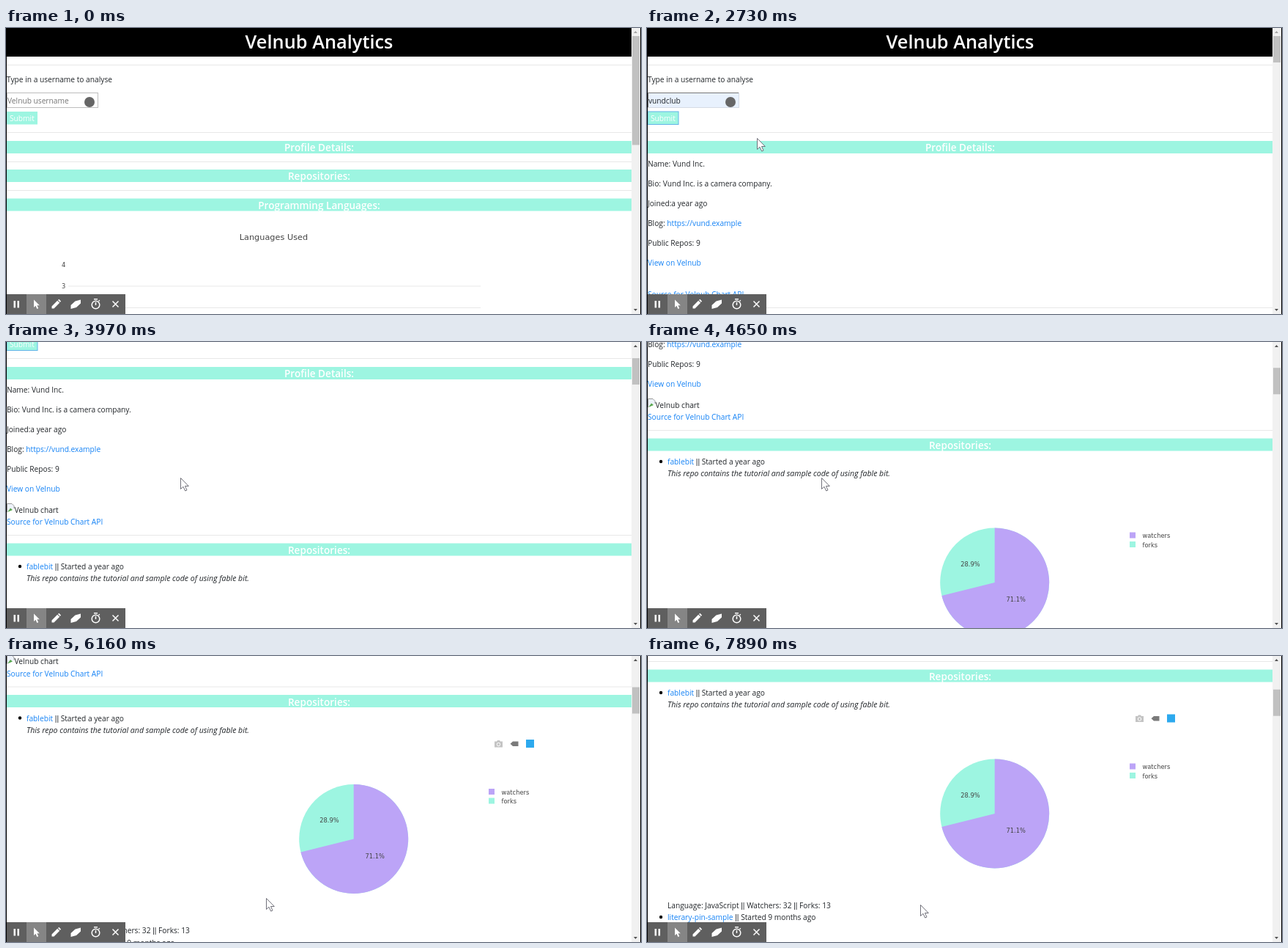
Recreate the animation shown at these times as an HTML page. Size 867 by 390 pixels, loop 8000 ms.

```html
<!DOCTYPE html>
<html lang="en">
<head>
<meta charset="utf-8">
<title>Analytics page</title>
<style>
html, body { margin: 0; width: 100%; height: 100%; overflow: hidden; background: #fff }
svg { display: block; width: 100%; height: 100% }
text { font: 10.2px "Open Sans", sans-serif; fill: #212529; white-space: pre }
.title { font-size: 25.4px; font-weight: 600; fill: #fff; text-anchor: middle }
.head { font-size: 13.6px; font-weight: 600; fill: #fff; text-anchor: middle }
.link { fill: #1482f5 }
.bar { font-family: "Liberation Sans", sans-serif }
.note { font-size: 10.55px; font-style: italic }
.plot text { font: 8.3px "DejaVu Sans", sans-serif; fill: #444 }
.plot .name { font-size: 11.3px }
.teal { fill: #9df5e1 }
.violet { fill: #bca4f7 }
.rule { stroke: #e8e8e8; fill: none }
.mid { text-anchor: middle }
</style>
</head>
<body>
<svg viewBox="0 0 867 390">
  <g id="page">
    <rect width="854" height="39"/>
    <text class="title" x="427.5" y="28">Velnub Analytics</text>
    <path class="rule" d="M1 50.5H854M1 142.5H854"/>
    <text x="1" y="74">Type in a username to analyse</text>

    <rect id="field" x="1.5" y="88.5" width="124" height="20"/>
    <path id="inset" d="M1.5 108V88.5H125" fill="none" stroke="#777"/>
    <text id="hint" x="2" y="103" style="fill:#757575">Velnub username</text>
    <text id="typed" x="2" y="103"></text>
    <path id="squiggle" stroke="#e03c3c" fill="none"/>
    <path id="caret" stroke="#111" fill="none"/>
    <circle cx="114" cy="101" r="7" fill="#666"/>

    <rect id="button" class="teal" x="1" y="114" width="42" height="17.5"/>
    <text x="5" y="127" style="fill:#fff">Submit</text>

    <rect class="teal" x="1" y="154" width="853" height="17"/>
    <text class="head" x="427.5" y="168">Profile Details:</text>

    <g id="empty">
      <path class="rule" d="M1 182.5H854M1 221.5H854"/>
      <rect class="teal" x="1" y="193" width="853" height="17"/>
      <text class="head" x="427.5" y="207">Repositories:</text>
      <rect class="teal" x="1" y="232.5" width="853" height="17"/>
      <text class="head" x="427.5" y="247">Programming Languages:</text>
      <g class="plot">
        <path class="rule" d="M85 352H648M85 381.5H648"/>
        <text class="name mid" x="365.5" y="289">Languages Used</text>
        <text x="76" y="325.5">4</text>
        <text x="76" y="355">3</text>
      </g>
    </g>

    <g id="loaded">
      <text x="1" y="189">Name: Vund Inc.</text>
      <text x="1" y="216">Bio: Vund Inc. is a camera company.</text>
      <text x="1" y="243">Joined:a year ago</text>
      <text x="1" y="270">Blog: <tspan class="link">https://vund.example</tspan></text>
      <text x="1" y="297">Public Repos: 9</text>
      <text x="1" y="324" class="link">View on Velnub</text>
      <g id="alt">
        <path d="M1.5 352V340.5H8L11 343.5V347" fill="#eef3fb" stroke="#999"/>
        <path d="M2 352L6 346.5L9 349Z" fill="#5aa850"/>
        <text x="11.5" y="352.5">Velnub chart</text>
      </g>
      <g id="rest">
        <text x="1" y="369" class="link">Source for Velnub Chart API</text>
        <path class="rule" d="M1 383.5H854"/>
        <rect class="teal" x="1" y="394.5" width="853" height="17"/>
        <text class="head" x="427.5" y="409">Repositories:</text>
        <circle cx="19" cy="426" r="2.2"/>
        <text x="28" y="430"><tspan class="link">fablebit</tspan> <tspan class="bar">||</tspan> Started a year ago</text>
        <text x="28" y="446" class="note">This repo contains the tutorial and sample code of using fable bit.</text>
        <g class="plot">
          <circle class="teal" cx="474.7" cy="591" r="74.5"/>
          <path class="violet" d="M474.7 591V516.5A74.5 74.5 0 1 1 402.4 609Z"/>
          <text class="mid" x="441.5" y="568.5">28.9%</text>
          <text class="mid" x="503.7" y="617">71.1%</text>
          <rect class="violet" x="659" y="522.5" width="8" height="8"/>
          <rect class="teal" x="659" y="535" width="8" height="8"/>
          <text x="676.5" y="530">watchers</text>
          <text x="676.5" y="542.5">forks</text>
        </g>
        <g id="tools">
          <path d="M667 458H670L671 456.5H674L675 458H678V466H667Z" fill="#c4c4c4"/>
          <circle cx="672.5" cy="462" r="2.2" fill="#c4c4c4" stroke="#fff"/>
          <path d="M688.5 461.3L692 458H699.5V464.5H692Z" fill="#7a7a7a"/>
          <rect x="710" y="455.5" width="11" height="11" fill="#2da9ee"/>
        </g>
        <text x="28" y="719.5">Language: JavaScript <tspan class="bar">||</tspan> Watchers: 32 <tspan class="bar">||</tspan> Forks: 13</text>
        <circle cx="19" cy="732" r="2.2"/>
        <text x="28" y="736"><tspan class="link">literary-pin-sample</tspan> <tspan class="bar">||</tspan> Started 9 months ago</text>
        <text x="28" y="752" class="note">Sample code of literary pin.</text>
      </g>
    </g>
  </g>

  <rect x="854" width="12" height="390" fill="#f1f1f1"/>
  <rect id="thumb" x="855" width="10" fill="#c1c1c1"/>
  <path id="up" d="M857 7L859.5 4L862 7Z"/>
  <path d="M857 383L859.5 386L862 383Z" fill="#505050"/>
  <path d="M0 0H1V390H0ZM866 0H867V390H866Z"/>

  <rect x="1" y="363" width="162" height="27" fill="#5f5f5f"/>
  <rect x="28" y="363" width="27" height="27" fill="#858585"/>
  <g fill="#fff">
    <path d="M10.5 372H13V381.5H10.5ZM15.5 372H18V381.5H15.5Z"/>
    <path d="M38 370.5V381L40.5 378.8L42.3 383L44.2 382.2L42.4 378.2H45.8Z"/>
    <path d="M62.5 382.5V379.5L70.2 371.8L73.2 374.8L65.5 382.5ZM71 371L72.3 369.8L75 372.6L73.9 374Z"/>
    <path d="M88.5 378L94.5 372.5L102 370.5V375.5L96 381L88.5 383Z"/>
    <path d="M120 369H125V370.5H120Z"/>
  </g>
  <g fill="none" stroke="#fff" stroke-width="1.5">
    <circle cx="122.5" cy="377.5" r="5.3"/>
    <path d="M122.5 374V378M126.5 372.5L127.8 371.2M145.5 372.5L153.5 380.5M153.5 372.5L145.5 380.5"/>
  </g>

  <path id="beam" d="M-2.5 -7.5H2.5M0 -7.5V7.5M-2.5 7.5H2.5" fill="none" stroke="#222"/>
  <path id="arrow" d="M.5 .5V15.5L4 12.3L6.7 18L9 17L6.5 11.5H11.3Z" fill="#fff" stroke="#62626c" stroke-width=".9"/>
</svg>
<script>
const $ = id => document.getElementById(id);
const LOOP = 8000, USER = 'vundclub';
const FOCUS = 290, TYPE = 690, BLUR = 2240, LOAD = 2400, IMAGE = 3700;

// The screen refreshes in bursts: [first, last, count]
const ticks = [
  [0, 0, 1], [100, 690, 4], [980, 980, 1], [1260, 1260, 1], [1750, 2730, 7],
  [2890, 3370, 4], [3700, 3970, 3], [4120, 4650, 5], [4780, 4910, 2],
  [5240, 5850, 5], [6160, 7160, 8], [7290, 7890, 5]
].flatMap(([a, b, n]) =>
  Array.from({ length: n }, (_, i) => Math.floor(a + (b - a) * i / Math.max(1, n - 1))));

// Keys: [time, value, ...]
const scrollKeys = [[3210, 0], [3370, 4], [3970, 120], [4650, 263], [4910, 447],
  [5850, 447], [6160, 341.5], [6450, 305], [6730, 305], [7160, 376]];
const beamKeys = [[100, 70, 115], [300, 62, 100], [500, 60, 86]];
const arrowKeys = [[1900, 80, 140], [2080, 24, 120], [2403, 24, 120], [2730, 150, 150],
  [3210, 238, 185], [4910, 238, 185], [5240, 180, 230], [5545, 21, 290], [5700, 120, 350],
  [5850, 200, 361], [6160, 355, 330], [7160, 355, 330], [7440, 158, 334], [7890, 373, 339]];

function at(keys, t) {
  const i = keys.findIndex(k => k[0] > t);
  if (i < 0) return keys[keys.length - 1].slice(1);
  if (i === 0) return keys[0].slice(1);
  const a = keys[i - 1], b = keys[i], p = (t - a[0]) / (b[0] - a[0]);
  return a.slice(1).map((v, j) => v + (b[j + 1] - v) * p);
}
const set = (id, attrs) => {
  for (const k in attrs) $(id).setAttribute(k, attrs[k]);
};
const show = (id, on) => { $(id).style.display = on ? '' : 'none'; };
const move = (id, x, y) => set(id, { transform: `translate(${x} ${y})` });

function draw(t) {
  const focus = t >= FOCUS && t < BLUR, blurred = t >= BLUR, loaded = t >= LOAD;

  const text = t < 1260 ? '' : t < 1750 ? USER.slice(0, 6) : USER;
  $('typed').textContent = text;
  const end = 2 + (text ? $('typed').getComputedTextLength() : 0);
  set('field', {
    fill: focus || blurred ? '#e8f1fd' : '#fff',
    stroke: focus ? '#7f9fe2' : blurred ? '#d5dbe4' : '#bdbdbd'
  });
  set('caret', { d: `M${Math.round(end) + .5} 91.5V105.5` });
  set('squiggle', { d: `M2 104.5H${end}` });
  set('button', { stroke: blurred ? '#62b4e8' : 'none' });
  show('inset', blurred);
  show('hint', t < TYPE);
  show('caret', focus && !(t >= 980 && t < 1260));
  show('squiggle', focus && text === USER);

  show('empty', !loaded);
  show('loaded', loaded);
  show('alt', t >= IMAGE);
  move('rest', 0, t >= IMAGE ? 0 : -2);
  show('tools', t >= 5240 && !(t >= 7400 && t < 7700));

  const [scroll] = at(scrollKeys, t);
  move('page', 0, -scroll);
  set('thumb', { y: 11 + scroll * .0923, height: loaded ? 36 : 148.5 });
  set('up', { fill: scroll ? '#505050' : '#a3a3a3' });

  show('beam', t >= 100 && t < TYPE);
  move('beam', ...at(beamKeys, t));
  show('arrow', t >= 1900);
  move('arrow', ...at(arrowKeys, t).map(Math.round));
}

let start, last;
function frame(now) {
  start ??= now;
  const t = (now - start) % LOOP;
  const tick = ticks.filter(k => k <= t).pop();
  if (tick !== last) draw(last = tick);
  requestAnimationFrame(frame);
}
draw(0);
requestAnimationFrame(frame);
</script>
</body>
</html>
```
